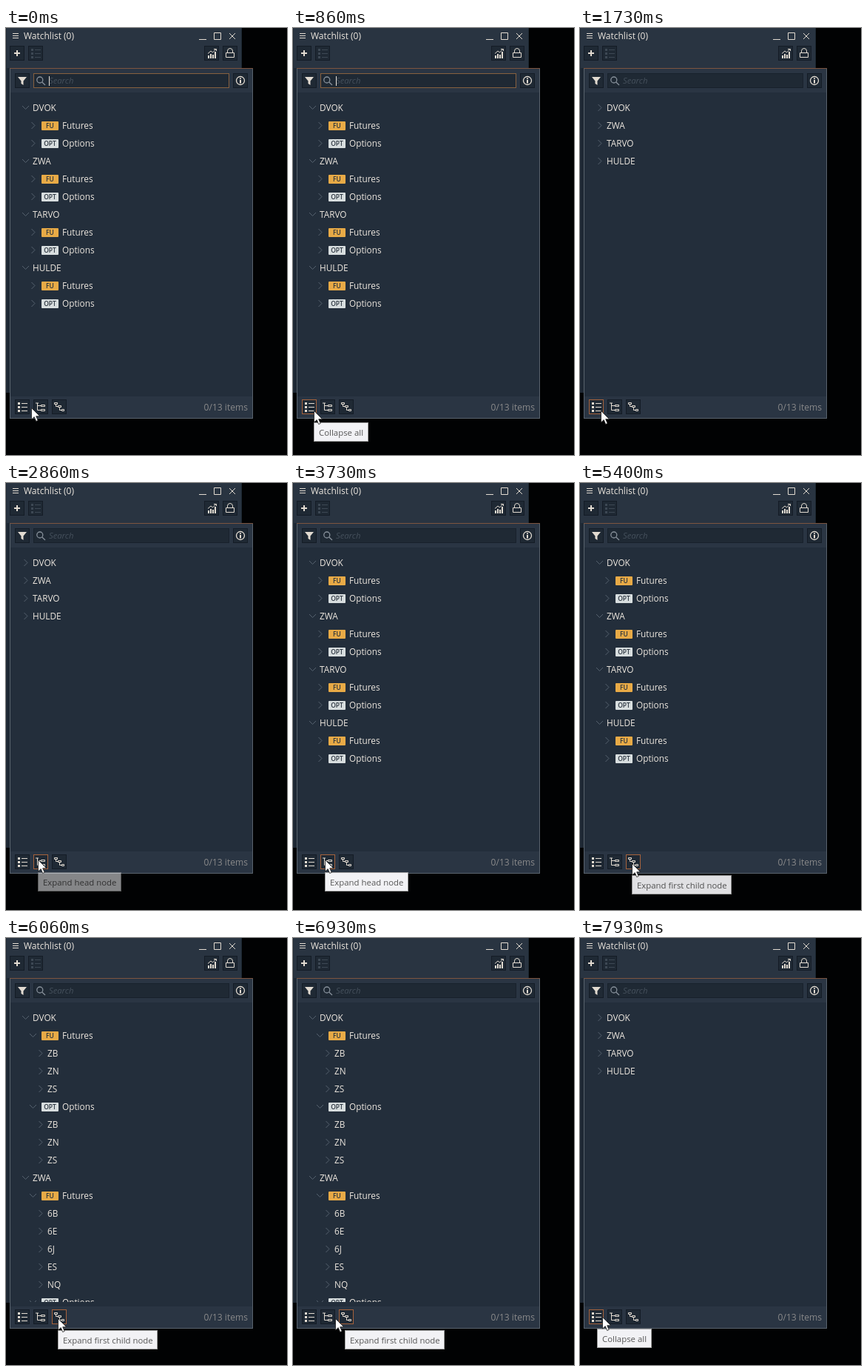
These frames come from a looping animation (380x576 px, 8 s). An HTML page:

```html
<!DOCTYPE html>
<html lang="en">
<head>
<meta charset="utf-8">
<title>Watchlist</title>
<style>
html, body { margin: 0; width: 100%; height: 100%; overflow: hidden; background: #010203; }
svg { display: block; }
text { font: 12px "Open Sans", "Noto Sans", sans-serif; fill: #ece6de; }
.row { font-size: 11.8px; }
.badge { font-size: 8.5px; font-weight: 600; fill: #28323d; text-anchor: middle; }
.btn { fill: #1f2934; stroke: #141c26; }
.field { fill: #1f2934; stroke: #18212c; }
.field.hot { stroke: #86603f; }
.btn.hot { stroke: #a5623c; }
.ico { fill: none; stroke: #e2dbd1; }
.solid { fill: #e2dbd1; }
.chev { fill: none; stroke: #56626f; }
.hint { font-style: italic; font-size: 11.3px; fill: #45505c; }
.tip rect { fill: #f2f2f5; stroke: #a0a0a0; }
.tip text { font-size: 11.4px; fill: #575757; }
</style>
</head>
<body>
<svg width="380" height="576" viewBox="0 0 380 576">
  <clipPath id="list"><rect x="6" y="87" width="327" height="404"/></clipPath>
  <path id="bullets" fill="none"/>

  <!-- window behind -->
  <path fill="#1e2834" d="M0 0H319V492H0Z"/>
  <path fill="#293441" d="M1 0H318V54H1Z"/>
  <path class="ico" d="M9 7.5H17M9 10.5H17M9 13.5H17M261 15.5H271M281.5 6.5H290.5V15.5H281.5ZM302 7L310 15M310 7L302 15"/>
  <text x="24" y="15">Watchlist (0)</text>
  <g class="btn">
    <rect x="5.5" y="24.5" width="19" height="19"/>
    <rect x="30.5" y="24.5" width="19" height="19"/>
    <rect x="268.5" y="24.5" width="19" height="19"/>
    <rect x="293.5" y="24.5" width="19" height="19"/>
  </g>
  <path class="ico" stroke-width="2" d="M11 34H19M15 30V38"/>
  <path fill="#3d4854" d="M34 28h3v3h-3zM34 33h3v3h-3zM34 38h3v3h-3zM39 29h8v1h-8zM39 34h8v1h-8zM39 39h8v1h-8z"/>
  <path class="solid" d="M273 37h2v4h-2zM276 35h2v6h-2zM279 36h2v5h-2zM282 32h2v9h-2z"/>
  <path class="ico" d="M273 34.5L277 31L279.5 33L284 28.5M281 28.5H284.5V31"/>
  <path class="ico" d="M297.5 33.5H308.5V39.5H297.5ZM299.5 33V31A3.5 3.5 0 0 1 306.5 31V33"/>

  <!-- drop-down panel -->
  <rect x="5.5" y="54.5" width="328" height="472" fill="#232e3b" stroke="#59636d"/>
  <path fill="#2a3543" d="M6 55H333V87H6ZM6 497H333V526H6Z"/>
  <path stroke="#7c543f" d="M5 54.5H334"/>
  <rect class="btn" x="12.5" y="61.5" width="19" height="19"/>
  <path class="solid" d="M16 66H28L23.5 71.5V77L20.5 75V71.5Z"/>
  <rect class="field" id="field" x="37.5" y="61.5" width="264" height="19"/>
  <path fill="none" stroke="#87909a" stroke-width="1.3" d="M49 73.2L53 77M49.8 70A4 4 0 1 0 41.8 70A4 4 0 1 0 49.8 70"/>
  <text class="hint" x="58" y="75">Search</text>
  <path id="caret" stroke="#e6e0d8" d="M58.5 65V78"/>
  <rect class="btn" x="307.5" y="61.5" width="19" height="19"/>
  <circle class="ico" cx="317" cy="71" r="5.5" stroke-width="1.3"/>
  <path class="ico" stroke-width="2" d="M317 67.5V69M317 70V74.5"/>

  <g id="trees" clip-path="url(#list)"></g>

  <g id="buttons">
    <rect class="btn" x="12.5" y="501.5" width="19" height="19"/>
    <rect class="btn" x="37.5" y="501.5" width="19" height="19"/>
    <rect class="btn" x="62.5" y="501.5" width="19" height="19"/>
  </g>
  <path class="solid" d="M16 505h3v3h-3zM16 510h3v3h-3zM16 515h3v3h-3zM21 506h8v1h-8zM21 511h8v1h-8zM21 516h8v1h-8z"/>
  <path class="ico" d="M40 506H44M42.5 506V515.5H47M42.5 509.5H47M47.5 508.5H52.5V510.5H47.5ZM47.5 514.5H52.5V516.5H47.5Z"/>
  <path class="ico" d="M65.5 505.5H69.5V507.5H65.5ZM67.5 508V510.5H70M70.5 509.5H74.5V511.5H70.5ZM72.5 512V515.5H75M75.5 514.5H78.5V516.5H75.5Z"/>
  <text x="327" y="516" text-anchor="end" style="fill:#89898a;font-size:12.1px">0/13 items</text>

  <g id="tips"></g>
  <path id="cursor" fill="#fff" stroke="#1b1b1b" stroke-width=".8" d="M.5 .5V16L4.2 12.6L6.7 18.5L9.2 17.4L6.7 11.7H11.7Z"/>
</svg>
<script>
const LOOP = 8000;
const $ = id => document.getElementById(id);

// Tree rows: [level, label, open]
const heads = ['DVOK', 'ZWA', 'TARVO', 'HULDE'];
const kinds = ['Futures', 'Options'];
const codes = [['ZB', 'ZN', 'ZS'], ['6B', '6E', '6J', 'ES', 'NQ']];
const closed = heads.map(h => [0, h, false]);
const halfOpen = heads.flatMap(h => [[0, h, true], ...kinds.map(k => [1, k, false])]);
const fullOpen = codes.flatMap((list, i) => [
  [0, heads[i], true],
  ...kinds.flatMap(k => [[1, k, true], ...list.map(c => [2, c, false])])
]);

function rowMarkup([level, label, open], i) {
  const y = 108 + 24 * i, x = 26.5 + 10 * level;
  const chevron = open ? `M${x - 4.5} ${y - 3}l4.5 4.5l4.5 -4.5` : `M${x - 2} ${y - 5}l4.5 4.5l-4.5 4.5`;
  const future = label === 'Futures';
  const badge = level === 1
    ? `<rect x="48" y="${y - 6}" width="23" height="12" rx="1" fill="${future ? '#e8aa46' : '#d8dedf'}"/>
       <text class="badge" x="59.5" y="${y + 3}">${future ? 'FU' : 'OPT'}</text>` : '';
  return `<path class="chev" d="${chevron}"/>${badge}
    <text class="row" x="${[36, 76, 56][level]}" y="${y + 4}">${label}</text>`;
}
$('trees').innerHTML = [closed, halfOpen, fullOpen]
  .map(rows => `<g>${rows.map(rowMarkup).join('')}</g>`).join('');

// Tooltips: x, y, width, label, shown from, hidden at
const tips = [
  [28, 532, 73, 'Collapse all', 730, 1600],
  [43, 525, 112, 'Expand head node', 2795, 4800],
  [70, 529, 134, 'Expand first child node', 5290, 7000],
  [23, 527, 73, 'Collapse all', 7620, LOOP]
];
$('tips').innerHTML = tips.map(([x, y, w, label]) =>
  `<g class="tip"><rect x="${x + .5}" y="${y + .5}" width="${w}" height="25"/>
   <text x="${x + 7}" y="${y + 18}">${label}</text></g>`).join('');

// Steps: [start time, value]
const treeSteps = [[0, 1], [1600, 0], [3330, 1], [5730, 2], [7600, 0]];
const hoverSteps = [[0, -1], [200, 0], [2130, -1], [2330, 1], [4800, 2], [7000, 1], [7130, 0]];
const caretSteps = [[0, 1], [200, 0], [730, 1], [1260, 0]];
const path = [[0, 34, 512], [60, 34, 512], [400, 28, 516], [1930, 28, 516], [2600, 43, 508],
  [4530, 43, 508], [4730, 65, 511], [4930, 70, 513], [6700, 70, 513], [6930, 57, 513],
  [7200, 23, 511], [7760, 23, 511], [7930, 30, 511], [LOOP, 30, 511]];

const stepAt = (steps, t) => steps.filter(s => s[0] <= t).pop()[1];
const clamp = v => Math.max(0, Math.min(1, v));

function cursorAt(t) {
  const i = path.findIndex(p => p[0] > t);
  const [t0, x0, y0] = path[i - 1], [t1, x1, y1] = path[i];
  const k = (t - t0) / (t1 - t0);
  return [x0 + (x1 - x0) * k, y0 + (y1 - y0) * k].map(Math.round);
}

function draw(t) {
  const tree = stepAt(treeSteps, t), hover = stepAt(hoverSteps, t);
  [...$('trees').children].forEach((g, i) => g.style.display = i === tree ? '' : 'none');
  [...$('buttons').children].forEach((b, i) => b.classList.toggle('hot', i === hover));
  [...$('tips').children].forEach((g, i) => {
    const [from, until] = tips[i].slice(4);
    g.style.opacity = t < until ? clamp((t - from) / 120) : 0;
  });
  $('field').classList.toggle('hot', t < 1600);
  $('caret').style.opacity = stepAt(caretSteps, t);
  $('cursor').setAttribute('transform', `translate(${cursorAt(t)})`);
}

function tick() {
  draw(performance.now() % LOOP);
  requestAnimationFrame(tick);
}
tick();
</script>
</body>
</html>
```
